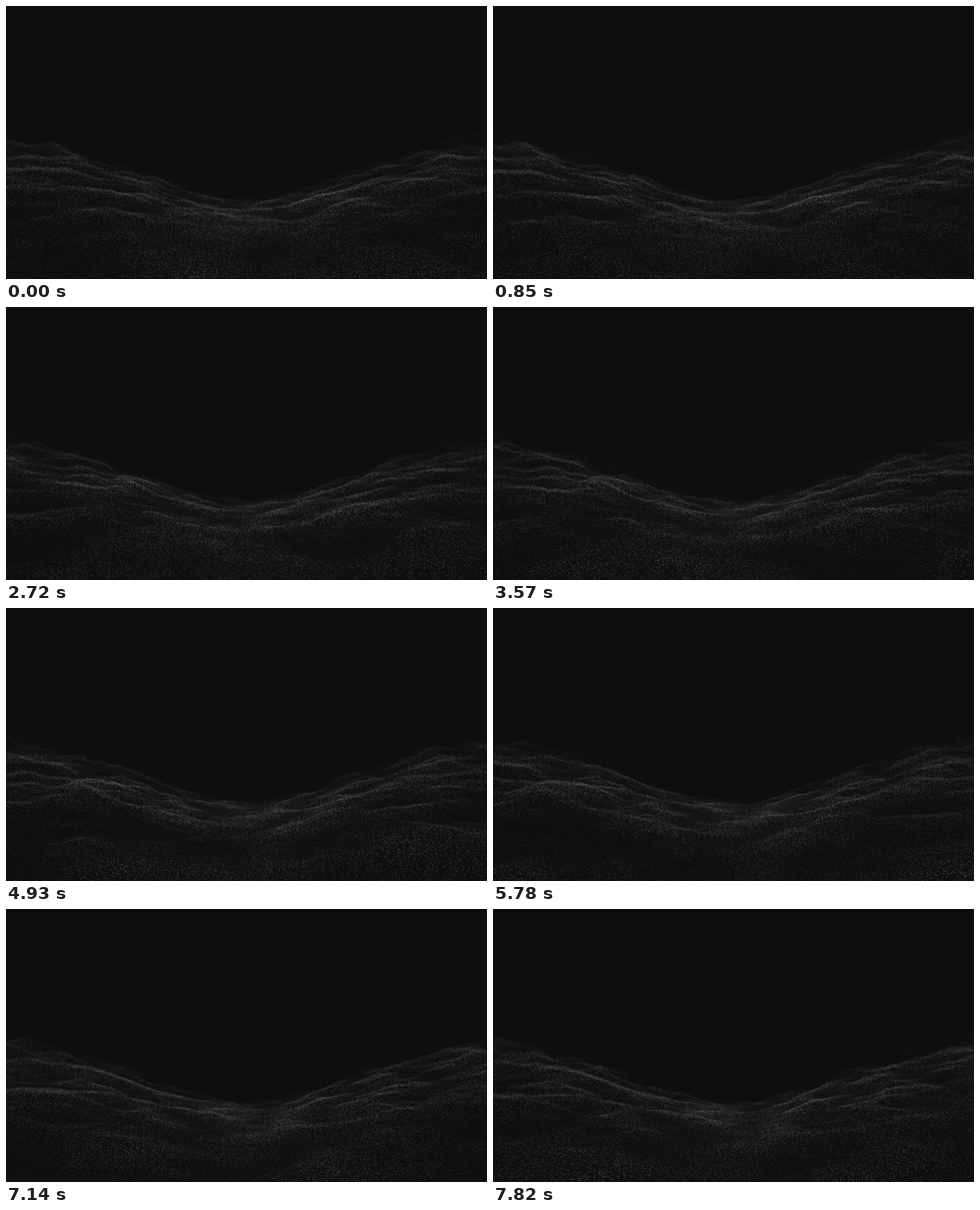
Write an HTML page with a canvas that moves like this. It is 485 px wide and 275 px high and loops after 7.99 s.

```html
<!DOCTYPE html>
<html lang="en">
<head>
<meta charset="utf-8">
<title>Particle valley</title>
<style>
  html, body { margin: 0; width: 100%; height: 100%; overflow: hidden; background: #0e0e0e; }
  canvas { display: block; width: 485px; height: 275px; }
</style>
</head>
<body>
<canvas id="stage" width="485" height="275"></canvas>
<script>
const W = 485, H = 275, CX = 242;
const LOOP = 7990, STEP = 170;
const SPEED = 0.082;          // depth units per second
const NEAR = 0.14, FAR = 1.06, DZ = 0.003;
const BG = 14, PEAK = 75;

const ctx = document.getElementById('stage').getContext('2d');
const img = ctx.createImageData(W, H);
const light = new Float32Array(W * H);

function random(seed) {
  return () => {
    seed = (seed + 0x6D2B79F5) | 0;
    let t = Math.imul(seed ^ (seed >>> 15), 1 | seed);
    t = (t + Math.imul(t ^ (t >>> 7), 61 | t)) ^ t;
    return ((t ^ (t >>> 14)) >>> 0) / 4294967296;
  };
}

const rnd = random(29);
const perm = new Uint8Array(512);
for (let i = 0; i < 256; i++) perm[i] = i;
for (let i = 255; i > 0; i--) {
  const j = Math.floor(rnd() * (i + 1));
  [perm[i], perm[j]] = [perm[j], perm[i]];
}
perm.copyWithin(256, 0, 256);
const gx = new Float32Array(256), gy = new Float32Array(256);
for (let i = 0; i < 256; i++) {
  const a = rnd() * Math.PI * 2;
  gx[i] = Math.cos(a);
  gy[i] = Math.sin(a);
}
// Sparse bright specks with mean 1, and small vertical offsets
const grain = Float32Array.from({ length: 65536 }, () => 4 * rnd() ** 3);
const jitter = Float32Array.from({ length: 65536 }, () => rnd() - 0.5);

const fade = t => t * t * t * (t * (t * 6 - 15) + 10);
const clamp = v => Math.max(0, Math.min(1, v));

function noise(x, y) {
  const fx = Math.floor(x), fy = Math.floor(y);
  const i = fx & 255, j = fy & 255;
  x -= fx;
  y -= fy;
  const a = perm[perm[i] + j], b = perm[perm[i + 1] + j];
  const c = perm[perm[i] + j + 1], d = perm[perm[i + 1] + j + 1];
  const u = fade(x), v = fade(y);
  const na = gx[a] * x + gy[a] * y;
  const nb = gx[b] * (x - 1) + gy[b] * y;
  const nc = gx[c] * x + gy[c] * (y - 1);
  const nd = gx[d] * (x - 1) + gy[d] * (y - 1);
  const top = na + u * (nb - na), low = nc + u * (nd - nc);
  return top + v * (low - top);
}

// Cross-section of the valley, 0 in the middle and about 1 at the sides
const side = new Float32Array(W), wall = new Float32Array(W);
for (let x = 0; x < W; x++) {
  const s = (x - CX) / CX;
  side[x] = s;
  wall[x] = 1.5 * s * s / (s * s + 0.5);
}

function glow(z) {
  const far = fade(clamp((FAR - z) / 0.4));
  const near = fade(clamp((z - 0.2) / 0.4));
  return (5 + 12 * near) * far;
}

function addRow(k, travel) {
  const depth = k * DZ, z = depth - travel;
  const level = glow(z);
  const offset = Math.imul(k, 7919);
  for (let x = 0; x < W; x++) {
    const s = side[x], X = s * z, reach = Math.abs(s), g = wall[x];
    const n = noise(X * 8 + 40, depth * 9)
      + 0.45 * noise(X * 19 + 90, depth * 18)
      + 0.16 * noise(X * 45 + 20, depth * 38);
    const relief = (1.5 + 10 * Math.abs(X)) * n;
    const cell = (offset + x) & 65535;
    const y = 170 + (23 - relief) / z - 66 * g * (0.5 + 0.5 * z)
      + jitter[cell] * (0.5 + 2.5 * reach);
    const iy = Math.floor(y);
    if (iy < 0 || iy >= H - 1) continue;
    const spread = DZ * (23 / (z * z) + 33 * g);
    const crest = Math.max(0.35, 0.85 + 1.5 * n);
    const w = level * spread * crest * (1.35 - 0.6 * reach) * grain[cell];
    const f = y - iy, p = iy * W + x;
    light[p] += w * (1 - f);
    light[p + W] += w * f;
  }
}

function draw(ms) {
  const travel = ms / 1000 * SPEED;
  light.fill(0);
  const first = Math.ceil((NEAR + travel) / DZ);
  const last = Math.floor((FAR + travel) / DZ);
  for (let k = first; k <= last; k++) addRow(k, travel);
  const px = img.data;
  for (let i = 0, p = 0; i < light.length; i++, p += 4) {
    const v = BG + PEAK * (1 - Math.exp(-light[i] / PEAK));
    px[p] = px[p + 1] = px[p + 2] = v;
    px[p + 3] = 255;
  }
  ctx.putImageData(img, 0, 0);
}

let shown = -1;
const start = performance.now();
function tick() {
  const t = (performance.now() - start) % LOOP;
  const step = Math.floor(t / STEP);
  if (step !== shown) {
    shown = step;
    draw(step * STEP);
  }
  requestAnimationFrame(tick);
}
tick();
</script>
</body>
</html>
```
